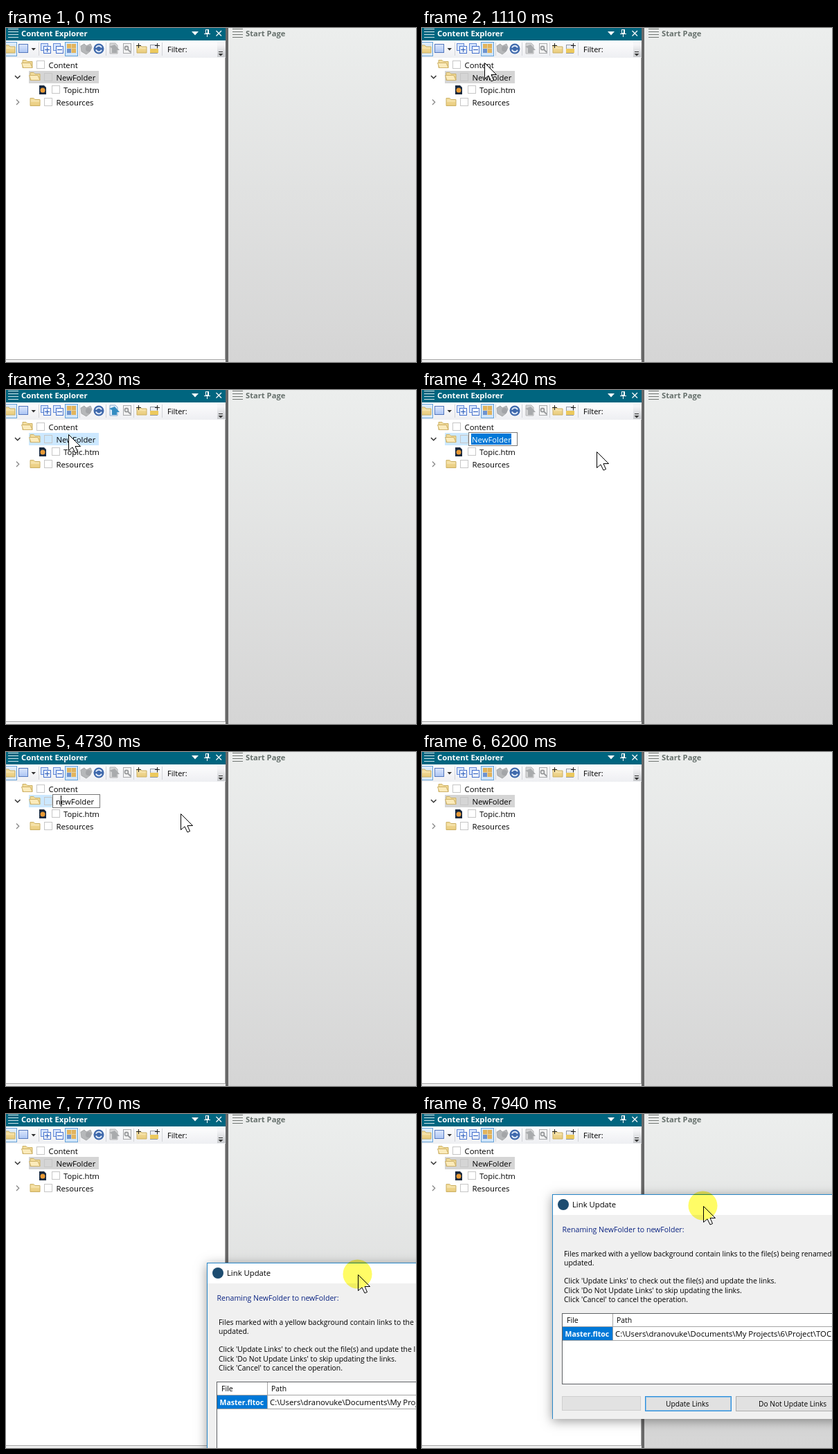
These frames come from a looping animation (592 by 483 pixels, 8 s). An HTML page with a canvas:

```html
<!DOCTYPE html>
<html lang="en">
<head>
<meta charset="utf-8">
<title>Rename a folder</title>
<style>
html, body { margin: 0; width: 592px; height: 483px; overflow: hidden; }
canvas { display: block; }
</style>
</head>
<body>
<canvas id="stage" width="592" height="483"></canvas>
<script>
const ctx = document.getElementById('stage').getContext('2d');
const LOOP = 8000;

// ---------- drawing helpers ----------
function rect(x, y, w, h, fill, stroke) {
  if (fill) { ctx.fillStyle = fill; ctx.fillRect(x, y, w, h); }
  if (stroke) {
    ctx.strokeStyle = stroke;
    ctx.lineWidth = 1;
    ctx.strokeRect(x + .5, y + .5, w - 1, h - 1);
  }
}
function shape(points, fill, stroke, width = 1, close = true) {
  ctx.beginPath();
  for (let i = 0; i < points.length; i += 2) ctx.lineTo(points[i], points[i + 1]);
  if (close) ctx.closePath();
  if (fill) { ctx.fillStyle = fill; ctx.fill(); }
  if (stroke) { ctx.strokeStyle = stroke; ctx.lineWidth = width; ctx.stroke(); }
}
const line = (points, color, width) => shape(points, null, color, width, false);
function disc(x, y, r, fill) {
  ctx.beginPath();
  ctx.arc(x, y, r, 0, 7);
  ctx.fillStyle = fill;
  ctx.fill();
}
function arc(x, y, r, from, to, color, width) {
  ctx.beginPath();
  ctx.arc(x, y, r, from, to);
  ctx.strokeStyle = color;
  ctx.lineWidth = width;
  ctx.stroke();
}
function text(str, x, y, color = '#000', size = 11.3, weight = 400) {
  ctx.font = `${weight} ${size}px "Open Sans", sans-serif`;
  ctx.fillStyle = color;
  ctx.fillText(str, x, y);
}
function gradient(y0, y1, from, to) {
  const g = ctx.createLinearGradient(0, y0, 0, y1);
  g.addColorStop(0, from);
  g.addColorStop(1, to);
  return g;
}
function burger(x, color) {
  for (let y = 1; y < 14; y += 4) rect(x, y, 15, 1, color);
}
function plus(x, y, color, both = true) {
  rect(x - 3, y, 7, 1, color);
  if (both) rect(x, y - 3, 1, 7, color);
}

// ---------- window parts ----------
function folder(x, y, open) {
  shape([x + 1, y + 1, x + 6, y + 1, x + 8, y + 3, x + 15, y + 3, x + 15, y + 12, x + 1, y + 12],
    gradient(y, y + 12, '#f6e3a8', '#e9cb7c'), '#cbb064');
  if (open) shape([x - .5, y + 5, x + 12, y + 5, x + 15, y + 12, x + 2, y + 12], '#fbebbb', '#cfb269');
  else line([x + 2, y + 5, x + 14, y + 5], '#fbedc2');
}
function checkbox(x, y, fill = '#fff') { rect(x, y, 12, 12, fill, '#c6c6c6'); }

function header() {
  rect(0, 0, 317, 18, '#00657f');
  burger(3, '#d5e6ea');
  text('Content Explorer', 22, 12, '#fff', 11.3, 700);
  shape([268, 5, 278, 5, 273, 10.5], '#fff');
  rect(288, 2, 5, 6, null, '#fff');
  rect(291, 2, 2, 6, '#fff');
  rect(286, 8, 9, 1, '#fff');
  rect(290, 9, 1, 4, '#fff');
  line([303.5, 4, 311, 11.5], '#fff', 1.2);
  line([311, 4, 303.5, 11.5], '#fff', 1.2);
}
function toolbar(active) {
  rect(0, 18, 317, 25, gradient(18, 43, '#fdfdfe', '#eeeff2'));
  rect(-2, 20, 18, 21, '#dcebfa', '#68a3d8');
  folder(-2, 24);
  rect(18, 23, 14, 13, gradient(23, 36, '#dfe9fc', '#a9c3f3'), '#5578bd');
  shape([36.5, 29, 43, 29, 39.7, 32.5], '#333');
  for (const x of [47, 106, 144, 184, 225]) rect(x, 21, 1, 19, '#d2d4d8');
  for (const x of [50, 68]) {
    rect(x, 22, 11, 11, '#d7e5fd', '#6389d6');
    rect(x + 4, 26, 11, 11, '#f2f7ff', '#4470cc');
    plus(x + 9, 31, '#2456b8', x === 50);
  }
  rect(85, 20, 19, 21, '#cfe5fa', '#68a3d8');
  rect(88, 23, 13, 13, '#e6d3a4');
  for (const x of [88, 95])
    for (const y of [23, 30]) rect(x, y, 6, 6, x === 88 && y === 30 ? '#6e93cf' : '#e3b45c');
  shape([108, 26, 113, 23, 116, 26, 122, 23, 124, 28, 121, 34, 116, 38, 109, 34], '#b6b8ba', '#a6a8aa');
  disc(119, 30, 4, '#a3a5a8');
  disc(134, 30, 7.5, '#3f69ac');
  arc(134, 30, 4.3, 3.5, 5.9, '#dfeaf8', 2);
  arc(134, 30, 4.3, .4, 2.8, '#dfeaf8', 2);
  shape([150, 22, 158, 22, 161, 25, 161, 37, 150, 37], active ? '#e2effc' : '#d4d5d6', active ? '#86a9cc' : '#b4b5b6');
  shape([149, 27, 157, 24, 164, 32, 160, 32, 160, 36, 153, 36, 153, 29],
    active ? '#358dc2' : '#a9abad');
  rect(169, 22, 12, 15, '#f4f4f4', '#a7a9ab');
  disc(174, 29, 3.4, '#999b9d');
  disc(174, 29, 1.6, '#f4f4f4');
  line([176, 31, 180, 35], '#999b9d', 2);
  folder(188, 24);
  plus(191, 25, '#222');
  rect(208, 24, 11, 13, gradient(24, 37, '#f3f4f7', '#d5dae4'), '#9298a5');
  rect(208, 30, 12, 6, '#ecc95d');
  plus(218, 25, '#222');
  text('Filter:', 233, 34.5, '#000', 11);
  rect(305, 19, 12, 23, gradient(24, 42, '#f5f5f7', '#c8cacd'));
  rect(307, 34, 6, 1, '#333');
  shape([306.5, 37, 313.5, 37, 310, 40.5], '#333');
}

function editor(t) {
  const name = t < 3870 ? 'NewFolder' : t < 4730 ? 'ewFolder' : 'newFolder';
  const right = t < 3870 ? 138 : t < 4730 ? 129 : 136;
  rect(67, 61, right - 67, 20, '#fff', '#777');
  const selected = t < 3470;
  if (selected) rect(71, 63, 58, 16, '#0078d7');
  text(name, 72, 75.5, selected ? '#fff' : '#000');
  if (t >= 2940 && t < 3240) rect(128, 63, 1, 16, '#ff8728');
  if (t >= 3470 && t < 4400) rect(71, 63, 1, 16, '#000');
  if (t >= 4730) rect(79, 63, 1, 16, '#000');
}
function tree(t, pointer) {
  rect(0, 43, 317, 437, '#fff');
  rect(316, 43, 1, 437, '#a8a8a8');
  const editing = t >= 2450 && t < 5260;
  const focused = t >= 2090 && t < 5500;
  const exploring = t >= 1280 && t < 2090;
  const onFolder = exploring && pointer.y >= 62 && pointer.y < 80;
  if (exploring && pointer.y >= 80) rect(44, 81, 96, 18, '#e5f3ff');
  const rowColor = focused || onFolder ? '#cce8ff' : '#d5d5d5';
  rect(33, 62, editing ? 36 : 101, 18, rowColor);

  folder(23, 45.5, true);
  checkbox(44, 47);
  text('Content', 61.5, 57.5);

  line([13, 69, 16.7, 72.7, 20.5, 69], '#333', 1.5);
  folder(34, 63.5, true);
  checkbox(55, 65, rowColor);
  if (editing) editor(t);
  else text(t >= 5260 && t < 5500 ? 'newFolder' : 'NewFolder', 72.5, 75.5);

  shape([48, 83, 55, 83, 58, 86, 58, 96, 48, 96], '#18293f');
  disc(53, 90, 3.5, '#e99a35');
  checkbox(66, 83);
  text('Topic.htm', 83, 94);

  line([15, 103.5, 18.7, 107.2, 15, 111], '#888', 1.3);
  folder(34, 100.5);
  checkbox(55, 101);
  text('Resources', 72.5, 112);

  rect(0, 479, 317, 4, '#f0f0f0');
  rect(0, 479, 317, 1, '#a5a5a5');
}
function startPage() {
  rect(317, 0, 4, 483, '#686868');
  rect(321, 0, 271, 483, gradient(0, 483, '#eceeed', '#d5d5d5'));
  burger(327, '#707572');
  text('Start Page', 346, 12, '#66706c', 11.2, 700);
}

function dialog(x, y, settled) {
  const edge = settled ? '#2886c8' : '#404040';
  ctx.save();
  ctx.translate(x, y);
  ctx.shadowColor = 'rgba(0,0,0,.4)';
  ctx.shadowBlur = 15;
  ctx.shadowOffsetY = 3;
  rect(0, 0, 480, 325, '#f0f0f0');
  ctx.shadowColor = 'transparent';
  rect(0, 0, 480, 30, '#fff');
  rect(0, 0, 480, 1, edge);
  rect(0, 0, 1, 325, edge);
  disc(16, 15, 8, '#1d4c70');
  text('Link Update', 29, 19);
  text('Renaming NewFolder to newFolder:', 14.5, 54.5, '#0a2382', 10.6);
  const body = [
    [90, 'Files marked with a yellow background contain links to the file(s) being renamed'],
    [103, 'updated.'],
    [129, "Click 'Update Links' to check out the file(s) and update the links."],
    [142.5, "Click 'Do Not Update Links' to skip updating the links."],
    [156, "Click 'Cancel' to cancel the operation."]
  ];
  for (const [baseline, str] of body) text(str, 17, baseline, '#000', 10.42);

  rect(14, 172, 450, 103, '#fff', '#5f6266');
  rect(15, 191, 448, 1, '#a5a5a5');
  rect(15, 211, 448, 1, '#a5a5a5');
  rect(87, 173, 1, 39, '#a5a5a5');
  text('File', 21, 186, '#000', 10.6);
  text('Path', 93, 186, '#000', 10.4);
  rect(15, 192, 72, 19, '#0078d7');
  text('Master.fltoc', 18.5, 205.5, '#fff', 10.5, 700);
  text('C:\\Users\\dranovuke\\Documents\\My Projects\\6\\Project\\TOC', 91, 206, '#000', 11.33);

  rect(14, 292, 114, 21, '#e2e2e2', '#cfcfcf');
  rect(134, 292, 125, 22, '#e1e1e1', '#2c8edb');
  rect(135, 293, 123, 20, null, '#8cbfe6');
  text('Update Links', 164, 307, '#000', 10.25);
  rect(265, 292, 140, 22, '#e1e1e1', '#adadad');
  text('Do Not Update Links', 298, 307, '#000', 10.2);
  ctx.restore();
}
function cursor(x, y) {
  const outline = [0, 0, 0, 23, 5.5, 18.3, 9.5, 26.5, 13, 25, 9.5, 17, 17, 17];
  shape(outline.map((v, i) => v + (i % 2 ? y : x) + .5), '#fff', '#000');
}

// ---------- motion ----------
// Each move: start, end, number of held steps, from x, y, to x, y.
const moves = [
  [230, 570, 5, 660, 250, 224, 169],
  [800, 1110, 5, 224, 169, 90, 50],
  [1280, 1760, 7, 90, 50, 90, 88],
  [1950, 2230, 5, 90, 88, 90, 64],
  [2300, 2710, 6, 90, 64, 312, 84],
  [2940, 2940, 1, 312, 84, 252, 89],
  [6060, 6130, 2, 252, 89, 450, 169]
];
function pointerAt(t) {
  const move = moves.findLast(m => t >= m[0]);
  if (!move || t >= 6200) return { x: -99, y: -99 };
  const [start, end, steps, x0, y0, x1, y1] = move;
  const gap = (end - start) / (steps - 1);
  const step = t >= end ? steps : 1 + Math.floor((t - start) / gap);
  const p = step / steps;
  const k = p * p * (3 - 2 * p);
  return { x: Math.round(x0 + (x1 - x0) * k), y: Math.round(y0 + (y1 - y0) * k) };
}
// Dialog positions while it is dragged: time, x, y.
const drag = [
  [7530, 336, 260], [7600, 331, 255], [7700, 290, 215],
  [7780, 243, 169], [7860, 205, 132], [7940, 188, 116]
];

function draw(t) {
  const pointer = pointerAt(t);
  startPage();
  header();
  toolbar(t >= 2090 && t < 2450);
  tree(t, pointer);
  const held = drag.findLast(d => t >= d[0]);
  if (held) {
    const [, x, y] = held;
    dialog(x, y, t >= 7700);
    cursor(x + 218, y + 17);
    // The click marker tints the pointer as well.
    ctx.globalCompositeOperation = 'multiply';
    disc(x + 217.5, y + 16.5, 21, '#fffc66');
    ctx.globalCompositeOperation = 'source-over';
  } else if (pointer.x > -50) cursor(pointer.x, pointer.y);
}

const begin = performance.now();
function frame() {
  draw((performance.now() - begin) % LOOP);
  requestAnimationFrame(frame);
}
frame();
</script>
</body>
</html>
```
